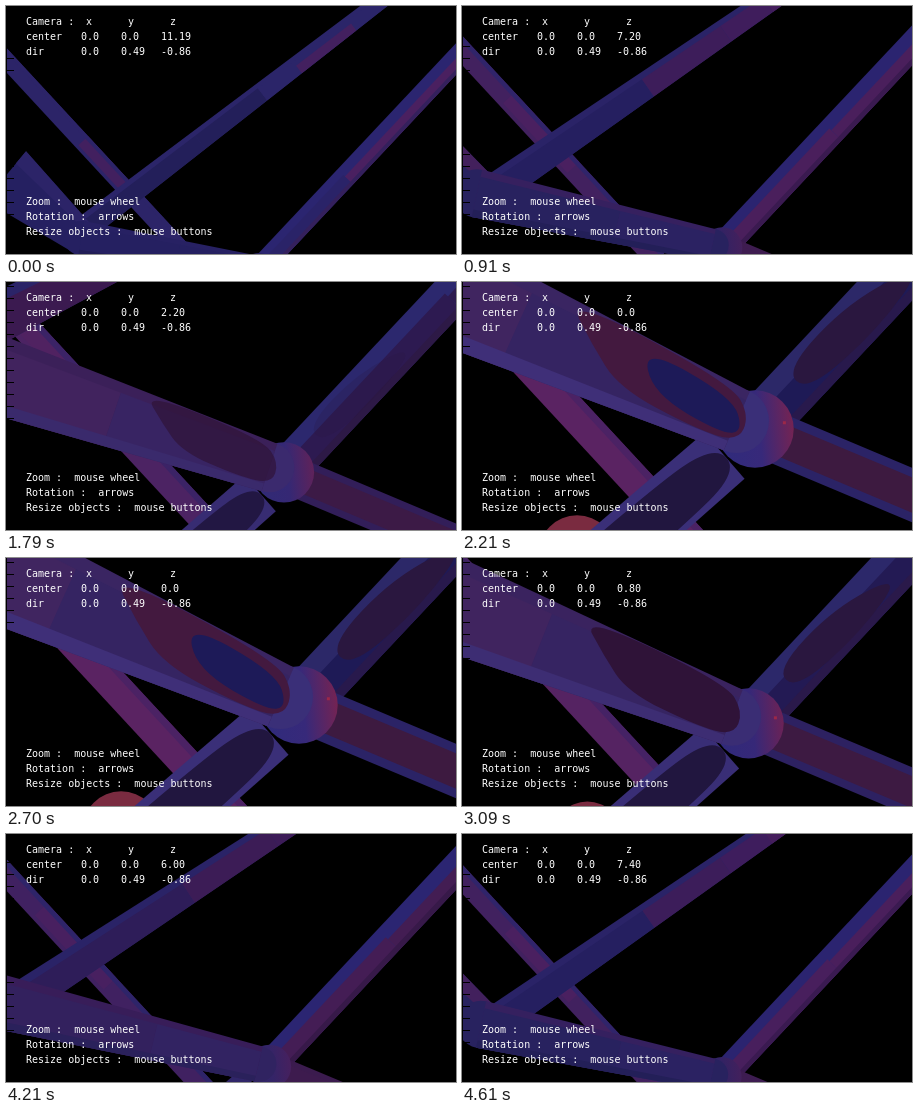
Animation of 450x248 px, one loop 4.7 s. Source, as an HTML page with a canvas:

```html
<!DOCTYPE html>
<html lang="en">
<head>
<meta charset="utf-8">
<title>Camera zoom</title>
<style>
  html, body { margin: 0; width: 100%; height: 100%; overflow: hidden; background: #000; }
  canvas { position: absolute; left: 0; top: 0; }
  span { position: absolute; color: #fff; white-space: pre;
         font: 10px/15px "DejaVu Sans Mono", "Liberation Mono", monospace; }
</style>
</head>
<body>
<canvas id="stage" width="450" height="248"></canvas>
<script>
const ctx = document.getElementById('stage').getContext('2d');
const LOOP = 4700;

// Camera z over steps of about 100 ms
const zoom = [[0, 11.2], [9, 7.2], [14, 4.4], [22, 0], [29, 0], [31, 0.8], [38, 4.4], [46, 7.4]];
const shadeAt = [0, 4.4, 7.2, 11.2];
const lerp = (a, b, t) => a + (b - a) * t;
const mix = (p, q, t) => p.map((n, i) => lerp(n, q[i], t));
let z = 0;

function cameraZ(step) {
  let i = 0;
  while (i < zoom.length - 2 && step >= zoom[i + 1][0]) i++;
  const [s0, a] = zoom[i], [s1, b] = zoom[i + 1];
  const value = Math.round(lerp(a, b, (step - s0) / (s1 - s0)) * 5) / 5;
  return value > 8 ? value - 0.01 : value;
}

// Four colours, from the nearest to the farthest camera
function shade(list) {
  const c = list.split(' ').map(h => [0, 2, 4].map(i => parseInt(h.substr(i, 2), 16)));
  let i = 0;
  while (i < 2 && z > shadeAt[i + 1]) i++;
  const t = (z - shadeAt[i]) / (shadeAt[i + 1] - shadeAt[i]);
  return `rgb(${mix(c[i], c[i + 1], Math.min(1, t)).map(Math.round)})`;
}

// Points are [x, y, depth]; travel along z expands from (225, 343)
const project = ([x, y, d]) => [225 + x / (d + z), 343 + y / (d + z)];

// Maps (u along, v across) on a strut to the stage
function surface(p, q, r) {
  const a = project(p), b = project(q);
  const len = Math.hypot(b[0] - a[0], b[1] - a[1]);
  const nx = -(b[1] - a[1]) / len, ny = (b[0] - a[0]) / len;
  return (u, v) => {
    const m = mix(p, q, u), [x, y] = project(m), k = v * r / (m[2] + z);
    return [x + nx * k, y + ny * k];
  };
}

function fill(points, color) {
  ctx.fillStyle = color;
  ctx.beginPath();
  points.forEach(p => ctx.lineTo(...p));
  ctx.fill();
}

function strut(p, q, r, bands) {
  const at = surface(p, q, r);
  for (const [u0, u1, v0, v1, colors] of bands)
    fill([at(u0, v0), at(u1, v0), at(u1, v1), at(u0, v1)], shade(colors));
  return at;
}

function disc(p, r, color) {
  const [x, y] = project(p);
  ctx.fillStyle = color;
  ctx.beginPath();
  ctx.arc(x, y, r / (p[2] + z), 0, 7);
  ctx.fill();
}

function patch(at, uv, color, alpha = 1) {
  const pts = uv.map(([u, v]) => at(u, v));
  const mid = (a, b) => mix(a, b, 0.5);
  ctx.globalAlpha = Math.max(0, Math.min(1, alpha));
  ctx.fillStyle = color;
  ctx.beginPath();
  ctx.moveTo(...mid(pts[pts.length - 1], pts[0]));
  pts.forEach((pt, i) => ctx.quadraticCurveTo(...pt, ...mid(pt, pts[(i + 1) % pts.length])));
  ctx.fill();
  ctx.globalAlpha = 1;
}

const hub = [527, -1519, 7.75];
const corner = [-2080, -1540, 2.7];
const ball = [-852, -550, 7.75];
const fromHub = (x, y, d) => [hub[0] + x, hub[1] + y, hub[2] + d];

function drawHub() {
  const [x, y] = project(hub), r = 300 / (hub[2] + z);
  const g = ctx.createLinearGradient(x - r, y, x + r, y - r * 0.2);
  g.addColorStop(0, shade('2f2b7c 302870 2c2468 28225f'));
  g.addColorStop(0.55, shade('37297a 33266d 342263 28225f'));
  g.addColorStop(1, shade('752352 4a2060 44205c 2b2262'));
  disc(hub, 300, g);
  if (z < 2) {
    ctx.fillStyle = '#9c2848';
    ctx.fillRect(x + r * 0.72, y - r * 0.2, 3, 3);
  }
}

function drawScene() {
  ctx.fillStyle = '#000';
  ctx.fillRect(0, 0, 450, 248);

  strut([732, -293, 12.2], [-5856, -7405, 12.2], 195, [
    [0, 1, -1, 1, '5a2362 3d2263 42215f 2c2468'],
    [0.45, 0.64, -0.6, 1, '5a2362 45205f 4a2060 42205f'],
    [0, 1, 0.55, 1, '4b2264 2b2468 30246a 2c2468']]);

  disc(ball, 300, '#7a2b40');

  strut([-2566, -1869, 5.26], [4400, -9392, 14.6], 205, [
    [0, 1, -1, 1, '2b2468 2b2468 2a2367 2b2569'],
    [0, 0.28, -0.55, 1, '3b1a50 3b1a50 251f60 231f5a'],
    [0.28, 0.458, -0.55, 1, '3b1a50 3b1a50 3d1d5a 231f5a'],
    [0.458, 1, -0.55, 1, '3b1a50 3a1b52 3f1d5c 2b2569'],
    [0.572, 0.777, 0, 1, '3b1a50 3a1b52 451e5c 43205f']]);

  const right = strut(hub, fromHub(4200, -4470, 0), 205, [
    [0, 1, -1, 1, '2c2868 2b2774 2b2470 2b2570'],
    [0, 0.39, -0.25, 1, '1e1a56 3b1a4b 4a1f5c 2a2368'],
    [0.39, 1, -0.05, 1, '1e1a56 3a1a48 4a1f5c 4a2060'],
    [0, 1, 0.65, 1, '28194c 32183f 3a1a50 34205c']]);
  patch(right, [[0.08, -0.7], [0.2, -0.7], [0.3, 0.4], [0.2, 0.8], [0.08, 0.5]], '#2a173f', (2.5 - z) / 1.5);

  strut(hub, fromHub(3400, 1430, 0), 195, [
    [0, 1, -1, 1, '2b2366 38194c 3e1c50 30205c'],
    [0, 1, -0.65, 0.65, '3d1a40 3b1a4b 3e1c50 30205c']]);

  drawHub();

  if (z > 4) {
    strut(corner, [-1620, -1245, -4], 230, [
      [0, 1, -1, 1, '2b2468 2b2468 28225f 252061'],
      [0, 1, 0.5, 1, '3b2060 3b2060 43205c 2c2468']]);
  }

  const left = fromHub(-2400, 2200, -0.8);
  const lower = strut(hub, left, 235, [[0.1, 1, -1, 1, '3a2f78 34286c 2d2467 28225f']]);
  patch(lower, [[0.1, -0.7], [0.1, 0.5], [0.3, 0.75], [1, 0.7], [1, -0.8], [0.3, -0.85]], '#21163f', (4 - z) / 2);

  const end = mix(corner, hub, 0.94);
  disc(corner, 240, shade('3a2060 42205c 28225f 252061'));
  disc(end, 240, shade('3a2f78 3b2463 28225f 252061'));
  const beam = strut(corner, end, 240, [
    [0, 1, -1, 1, '3a2562 3b1a50 36205f 272163'],
    [0, 0.5, -0.7, 1, '402560 42205c 28225f 252061'],
    [0.5, 1, -0.7, 1, '352462 3b2463 2b2262 252061'],
    [0, 1, 0.68, 1, '3f2f78 34245f 231f58 211d56']]);
  patch(beam, [[0.55, -1], [0.62, -0.25], [0.7, 0.45], [0.9, 0.7], [1.03, 0.6], [1.03, -0.3], [0.94, -0.95]],
    z < 0.5 ? '#43193f' : '#2f1338', (3.6 - z) / 2);
  patch(beam, [[0.71, -0.75], [0.77, 0.25], [0.98, 0.55], [1.03, 0.2], [0.96, -0.6]], '#1d1a58', 1 - z / 0.8);

  // Dark ruler on the left edge
  ctx.fillStyle = '#000';
  ctx.fillRect(0, 0, 1, 248);
  for (let y = 4; y < 248; y += 12) ctx.fillRect(0, y, 8, 1);
}

function label(x, y, text) {
  const el = document.createElement('span');
  el.style.left = x + 'px';
  el.style.top = y + 'px';
  el.textContent = text;
  document.body.append(el);
  return el;
}

const row = (y, xs, words) => words.map((word, i) => label(xs[i], y, word));
row(8, [20, 80, 122, 164], ['Camera :', 'x', 'y', 'z']);
const zLabel = row(23, [20, 75, 115, 155], ['center', '0.0', '0.0', ''])[3];
row(38, [20, 75, 115, 155], ['dir', '0.0', '0.49', '-0.86']);
['Zoom :  mouse wheel', 'Rotation :  arrows', 'Resize objects :  mouse buttons']
  .forEach((text, i) => label(20, 188 + 15 * i, text));

function frame() {
  const t = performance.now() % LOOP;
  z = cameraZ(Math.min(46, Math.floor((t + 10) / 100)));
  zLabel.textContent = z ? z.toFixed(2) : '0.0';
  drawScene();
  requestAnimationFrame(frame);
}
frame();
</script>
</body>
</html>
```
